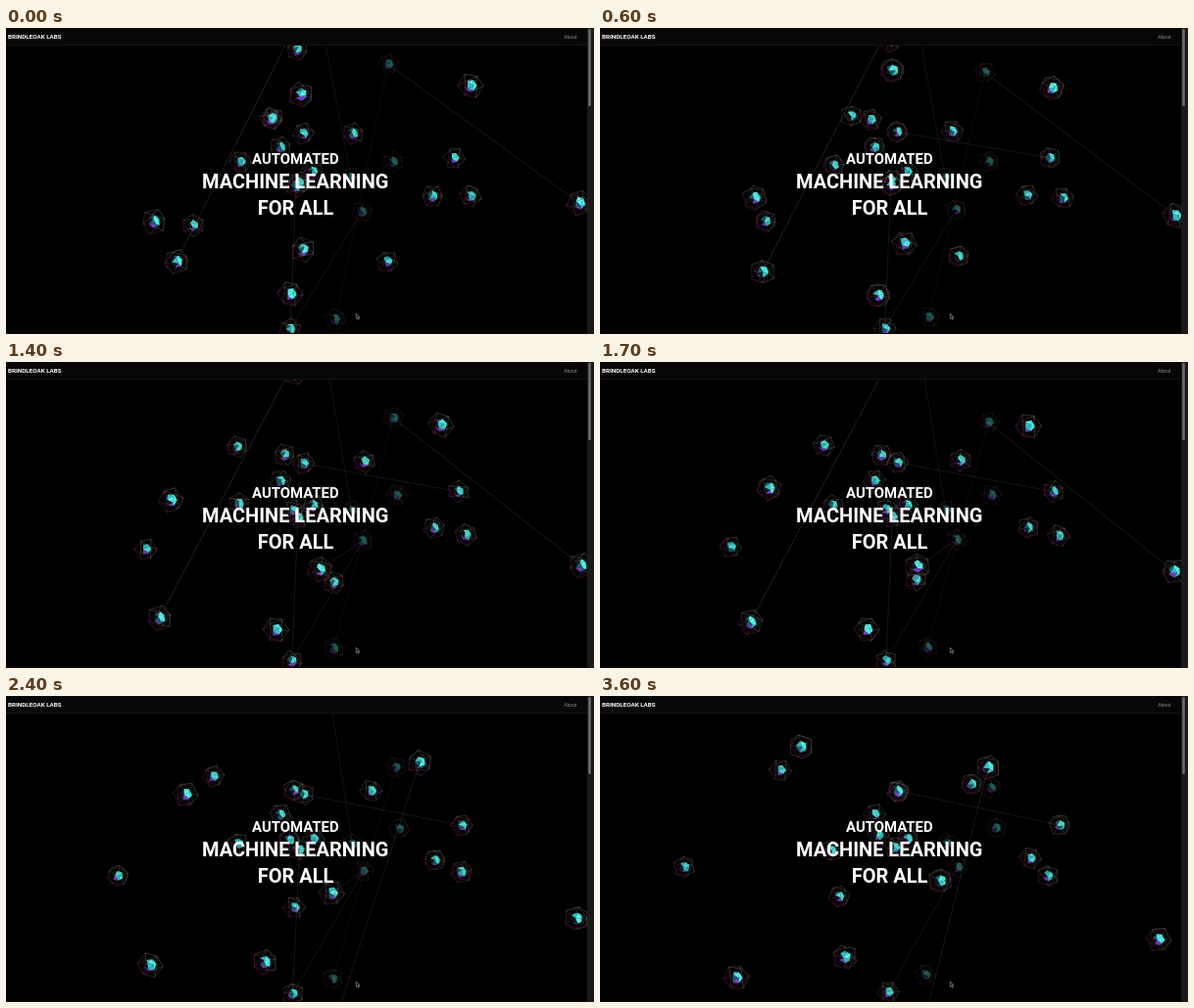
Write an HTML page with a canvas that moves like this. It is 600x313 px and loops after 3700 ms.

```html
<!DOCTYPE html>
<html lang="en">
<head>
<meta charset="utf-8">
<style>
  html, body { margin: 0; width: 100%; height: 100%; overflow: hidden; background: #000; }
  canvas, svg { position: absolute; left: 0; top: 0; width: 600px; height: 313px; }
  text { font-family: Roboto, Arial, sans-serif; fill: #fff; }
  .title { font-weight: 700; text-anchor: middle; }
</style>
</head>
<body>
<canvas id="stage" width="600" height="313"></canvas>
<svg viewBox="0 0 600 313">
  <rect width="593" height="18" fill="#080606"/>
  <rect y="17.2" width="593" height=".8" fill="#171414"/>
  <rect y="312" width="593" height="1" fill="#140309"/>
  <rect x="593" width="7" height="313" fill="#1c1a19"/>
  <rect x="594.2" y="1" width="2.6" height="79" rx="1.3" fill="#6d6b69"/>
  <text x="2" y="11.3" font-size="6.25" font-weight="700">BRINDLEOAK LABS</text>
  <text x="569.3" y="10.9" font-size="5" style="fill:#8c8a8a">About</text>
  <g class="title">
    <text x="295.3" y="139.2" font-size="14.9">AUTOMATED</text>
    <text x="295.2" y="164.2" font-size="20">MACHINE LEARNING</text>
    <text x="295.5" y="190.8" font-size="20">FOR ALL</text>
  </g>
  <path d="M357.3 292v5.4l1.2-1.1.9 2 .9-.4-.9-1.9h1.6z" fill="#111" stroke="#bbb" stroke-width=".5"/>
</svg>
<script>
const LOOP = 3700, STEP = 100, SPAN = 3.6;
const g = document.getElementById('stage').getContext('2d');

// Each node: start x, y, end x, y, then an optional bulge of the path at half time.
const groups = [
  { r: 13.3, glow: 1, nodes: {
    east: [474, 59, 396, 73], climb: [151, 198, 205, 52, -4, 0],
    sink: [174, 239, 139, 288, -4, 4], edge: [585, 179, 570, 249, 8, 2],
    low: [290, 272, 250, 267, 1, 4], rise: [303, 227, 347, 189], top: [301, 68, 284, -80] } },
  { r: 11.6, glow: .9, nodes: {
    gone: [297, 22, 292, -28], left: [272, 92, 184, 76, -2, 1], twin: [270, 93, 304, 98, 1, 0],
    hub: [303, 108, 304, 97], up: [354, 108, 379, 90, 2, 1], still: [280, 122, 280, 121],
    word: [239, 137, 236, 158], back: [299, 158, 284, 142], gap: [313, 147, 314, 146],
    mid: [296, 162, 301, 155], right: [457, 133, 469, 132], pair: [435, 172, 439, 166],
    drift: [474, 172, 457, 184, 2, 0], west: [191, 202, 86, 175, -8, 0],
    cross: [389, 239, 244, 205, 2, 0], foot: [290, 308, 294, 303] } },
  { r: 11.2, glow: .36, nodes: {
    dim: [390, 37, 399, 94, 2, -2], pale: [395, 137, 404, 135],
    shade: [363, 188, 365, 175], dusk: [336, 298, 332, 285], veil: [352, 153, 354, 151] } },
  // Line ends outside the visible area
  { r: 0, nodes: { roof: [294, 0, 294, 0], sky: [321, -10, 333, -10], floor: [354, 316, 335, 316] } }
];

// From, to, alpha, first and last second
const links = [
  ['sink', 'roof', .18, 0, 1.8], ['dim', 'edge', .15, 0, 1.8], ['veil', 'sky', .09, 0, 3.2],
  ['hub', 'right', .13, .3, 4], ['foot', 'mid', .13, 0, 2.7], ['foot', 'shade', .1, 0, 4],
  ['dim', 'dusk', .06, 0, 2.9], ['east', 'floor', .13, 1.9, 4], ['rise', 'shade', .12, 1.2, 3]
];

// Unit icosahedron
const phi = (1 + Math.sqrt(5)) / 2, verts = [], edges = [], faces = [];
for (const a of [-1, 1]) for (const b of [-phi, phi])
  verts.push([0, a, b], [a, b, 0], [b, 0, a]);
const near = (i, j) => Math.hypot(...verts[i].map((v, k) => v - verts[j][k])) < 2.1;
for (let i = 0; i < 12; i++) for (let j = i + 1; j < 12; j++) if (near(i, j)) {
  edges.push([i, j]);
  for (let k = j + 1; k < 12; k++) if (near(i, k) && near(j, k)) faces.push([i, j, k]);
}
const size = Math.hypot(1, phi);

function turn([x, y, z], a, b) {
  const u = x * Math.cos(a) + z * Math.sin(a), w = z * Math.cos(a) - x * Math.sin(a);
  return [u, y * Math.cos(b) - w * Math.sin(b), w * Math.cos(b) + y * Math.sin(b)].map(v => v / size);
}

function place([x, y, x1, y1, bx = 0, by = 0], t) {
  const u = t / SPAN, arc = 4 * u * (1 - u);
  return [x + (x1 - x) * u + bx * arc, y + (y1 - y) * u + by * arc];
}

function faceColor([x, y, z]) {
  const lit = .7 * x - .35 * y + .45 * z;
  if (y > .6 && x < .35) return '#7440c8';
  if (lit > .45) return '#58f0e8';
  if (lit > .25) return '#35bcc4';
  if (lit > 0) return '#17606a';
  return '#0b1a20';
}

function drawNode([x, y], r, glow, seed, t) {
  const a = seed * 2.4 + t * .7, b = seed * 1.3 + t * .45;
  const hull = verts.map(v => turn(v, a, b)), core = verts.map(v => turn(v, -a, b + 1));
  g.save();
  g.translate(x, y);
  g.lineWidth = .5;
  for (const [i, j] of edges) {
    const p = hull[i], q = hull[j], warm = p[0] + q[0] - p[1] - q[1];
    g.globalAlpha = glow * (p[2] + q[2] > -.3 ? .5 : .25);
    g.strokeStyle = warm > -.6 ? '#a0918c' : '#a03a80';
    g.beginPath();
    g.moveTo(p[0] * r, p[1] * r);
    g.lineTo(q[0] * r, q[1] * r);
    g.stroke();
  }
  g.globalAlpha = glow;
  const s = r * .5;
  for (const f of faces) {
    const n = [0, 1, 2].map(k => f.reduce((sum, i) => sum + core[i][k], 0) / 2.38);
    if (n[2] <= 0) continue;
    g.fillStyle = faceColor(n);
    g.beginPath();
    for (const i of f) g.lineTo(core[i][0] * s, core[i][1] * s);
    g.fill();
  }
  g.restore();
}

function draw(t) {
  g.globalAlpha = 1;
  g.fillStyle = '#000';
  g.fillRect(0, 0, 600, 313);
  const at = {};
  for (const { nodes } of groups)
    for (const id in nodes) at[id] = place(nodes[id], t);

  g.strokeStyle = '#fff';
  g.lineWidth = .7;
  for (const [from, to, alpha, start, end] of links) {
    if (t < start || t > end) continue;
    g.globalAlpha = alpha;
    g.beginPath();
    g.moveTo(...at[from]);
    g.lineTo(...at[to]);
    g.stroke();
  }
  let seed = 1;
  for (const { r, glow, nodes } of [...groups].reverse())
    for (const id in nodes) if (r) drawNode(at[id], r, glow, seed++, t);
}

const begin = performance.now();
function tick() {
  const ms = (performance.now() - begin) % LOOP;
  draw(Math.floor(ms / STEP) * STEP / 1000);
  requestAnimationFrame(tick);
}
tick();
</script>
</body>
</html>
```
